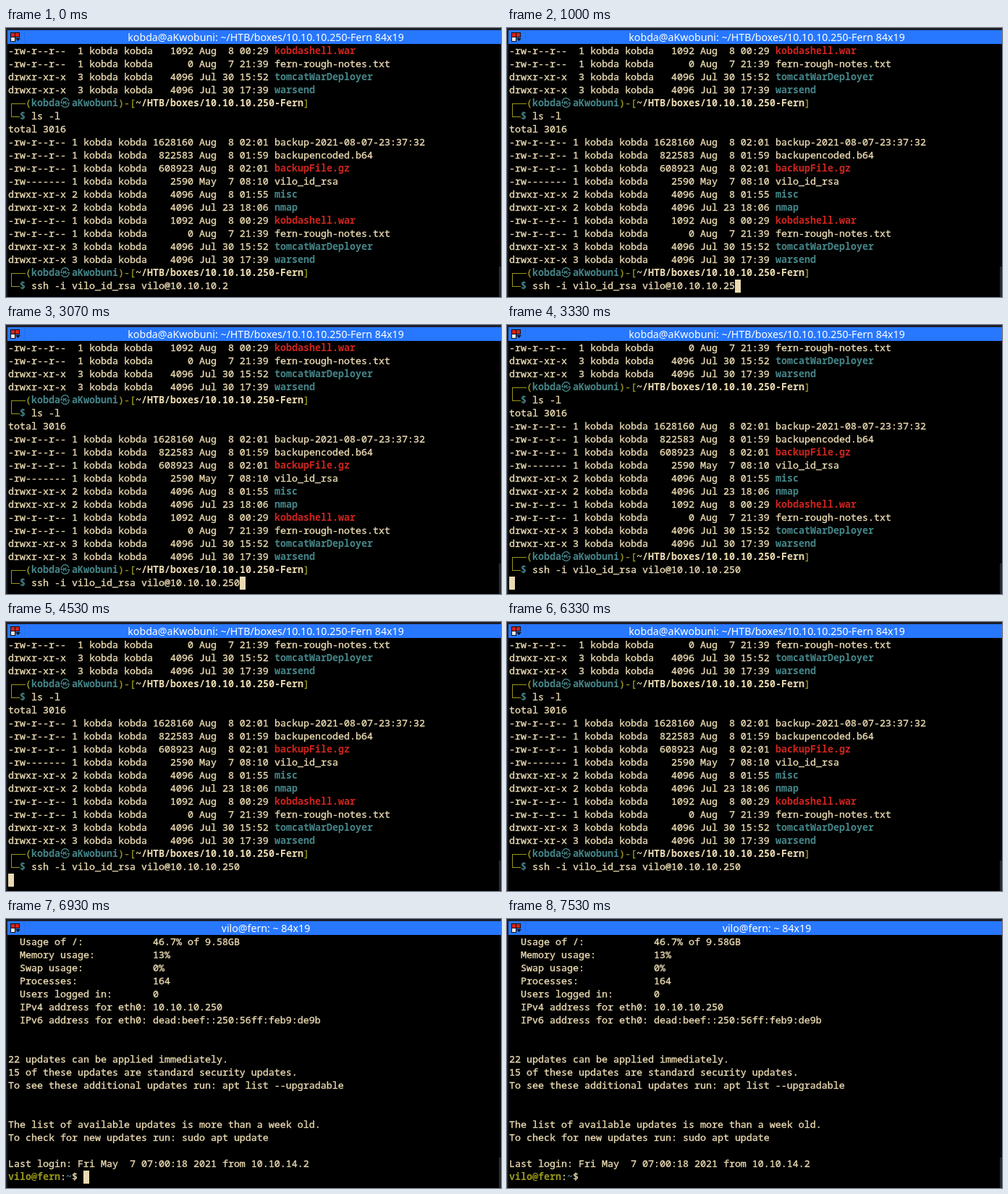
Recreate the animation shown at these times as an HTML page with a canvas. Size 684 by 371 pixels, loop 8000 ms.

```html
<!DOCTYPE html>
<html lang="en">
<head>
<meta charset="utf-8">
<title>Terminal</title>
<style>
html, body { margin: 0; width: 684px; height: 371px; overflow: hidden; background: #000; }
canvas { display: block; }
</style>
</head>
<body>
<canvas id="stage" width="684" height="371"></canvas>
<script>
const ctx = document.getElementById('stage').getContext('2d');
const CELL = 8, ROW = 18, LEFT = 3, TOP = 23, LOOP = 8000;
const FG = '#ebdbb2', TEAL = '#458588', RED = '#cc241d', OLIVE = '#98971a';
const MONO = '13.333px "Noto Sans Mono", "DejaVu Sans Mono", monospace';
const CJK = 'bold 13.333px "Noto Sans CJK KR", "Noto Sans CJK JP", sans-serif';

// A line is a list of runs: [text, colour, bold].
const plain = text => [[text, FG]];
const file = (mode, size, date, name, color) => {
  const owner = mode + ' kobda kobda';
  return [
    [owner + String(size).padStart(32 - owner.length) + ' ' + date + ' ', FG],
    [name, color || FG, !!color]
  ];
};
const head = [
  ['┌──', OLIVE], ['(', OLIVE], ['kobda', TEAL, true], ['㉿', TEAL, true],
  ['aKwobuni', TEAL, true], [')-[', OLIVE],
  ['~/HTB/boxes/10.10.10.250-Fern', FG, true], [']', OLIVE]
];
const command = text => [['└─', OLIVE], ['$', TEAL, true], [' ' + text, FG]];

const tail = gap => [
  file('-rw-r--r--' + gap + '1', 1092, 'Aug  8 00:29', 'kobdashell.war', RED),
  file('-rw-r--r--' + gap + '1', 0, 'Aug  7 21:39', 'fern-rough-notes.txt'),
  file('drwxr-xr-x' + gap + '3', 4096, 'Jul 30 15:52', 'tomcatWarDeployer', TEAL),
  file('drwxr-xr-x' + gap + '3', 4096, 'Jul 30 17:39', 'warsend', TEAL)
];

const listing = [
  ...tail('  '),
  head,
  command('ls -l'),
  plain('total 3016'),
  file('-rw-r--r-- 1', 1628160, 'Aug  8 02:01', 'backup-2021-08-07-23:37:32'),
  file('-rw-r--r-- 1', 822583, 'Aug  8 01:59', 'backupencoded.b64'),
  file('-rw-r--r-- 1', 608923, 'Aug  8 02:01', 'backupFile.gz', RED),
  file('-rw------- 1', 2590, 'May  7 08:10', 'vilo_id_rsa'),
  file('drwxr-xr-x 2', 4096, 'Aug  8 01:55', 'misc', TEAL),
  file('drwxr-xr-x 2', 4096, 'Jul 23 18:06', 'nmap', TEAL),
  ...tail(' '),
  head
];

const welcome = [
  '  Usage of /:            46.7% of 9.58GB',
  '  Memory usage:          13%',
  '  Swap usage:            0%',
  '  Processes:             164',
  '  Users logged in:       0',
  '  IPv4 address for eth0: 10.10.10.250',
  '  IPv6 address for eth0: dead:beef::250:56ff:feb9:de9b',
  '', '',
  '22 updates can be applied immediately.',
  '15 of these updates are standard security updates.',
  'To see these additional updates run: apt list --upgradable',
  '', '',
  'The list of available updates is more than a week old.',
  'To check for new updates run: sudo apt update',
  '',
  'Last login: Fri May  7 07:00:18 2021 from 10.10.14.2'
].map(plain);
const remotePrompt = [['vilo@fern', OLIVE, true], [':', FG], ['~', TEAL, true], ['$ ', FG]];

function rect(color, x, y, w, h) {
  ctx.fillStyle = color;
  ctx.fillRect(x, y, w, h);
}

function drawLine(runs, row) {
  const y = TOP + row * ROW;
  let x = LEFT;
  for (const [text, color, bold] of runs) {
    const first = text[0], badge = first === '㉿';
    if (first === '┌' || first === '└') {
      rect(color, x + 4, y + 9, text.length * CELL - 4, 1);
      rect(color, x + 4, first === '┌' ? y + 9 : y, 1, 9);
    } else {
      ctx.font = badge ? CJK : (bold ? 'bold ' : '') + MONO;
      ctx.fillStyle = ctx.strokeStyle = color;
      ctx.fillText(text, x, y + 13);
      // A hairline outline gives regular text its medium weight.
      ctx.lineWidth = 0.35;
      if (!bold) ctx.strokeText(text, x, y + 13);
    }
    x += CELL * (badge ? 2 : text.length);
  }
}

function drawWindow(title) {
  rect('#000', 0, 0, 684, 371);
  rect('#1d1f28', 0, 0, 684, 3);
  rect('#1d1f28', 0, 3, 2, 368);
  rect('#2777ff', 2, 3, 682, 19);
  rect('#246fee', 25, 4, 1, 17);
  // Scrollbar trough and thumb
  rect('#07080c', 681, 22, 3, 349);
  rect('#26282f', 681, 329, 3, 42);
  // Grouping button
  rect('#111', 6, 6, 13, 13);
  rect('#d3221c', 7, 7, 5, 5);
  rect('#d3221c', 13, 7, 5, 5);
  rect('#e6e6e6', 7, 13, 5, 5);
  rect('#2777ff', 13, 13, 6, 6);
  ctx.fillStyle = '#111';
  ctx.beginPath();
  ctx.moveTo(13, 14);
  ctx.lineTo(20, 14);
  ctx.lineTo(16.5, 18);
  ctx.fill();

  ctx.font = '14.2px "Noto Sans", sans-serif';
  ctx.fillStyle = '#fff';
  ctx.textAlign = 'center';
  ctx.fillText(title, 359, 18);
  ctx.textAlign = 'left';
}

const CURSOR_SPANS = [[400, 1530], [1870, 2470], [3070, 3930], [4530, 5130], [5730, 6330], [6930, 7530]];

function draw(now) {
  const t = now % LOOP;
  const entered = t >= 3330, loggedIn = t >= 6730, ready = t >= 6800;
  const typed = '10.10.10.2' + (t >= 1000 ? '5' : '') + (t >= 1870 ? '0' : '');
  const ssh = command('ssh -i vilo_id_rsa vilo@' + typed);

  let lines = [...listing, ssh];
  if (loggedIn) lines = [...welcome, ready ? remotePrompt : []];
  else if (entered) lines = [...lines.slice(1), []];

  drawWindow(ready ? 'vilo@fern: ~ 84x19' : 'kobda@aKwobuni: ~/HTB/boxes/10.10.10.250-Fern 84x19');
  lines.forEach(drawLine);

  if (CURSOR_SPANS.some(([from, to]) => t >= from && t < to)) {
    const column = lines[18].reduce((sum, [text]) => sum + text.length, 0);
    rect(FG, LEFT + column * CELL, TOP + 18 * ROW, CELL, ROW);
  }
  requestAnimationFrame(draw);
}
requestAnimationFrame(draw);
</script>
</body>
</html>
```
